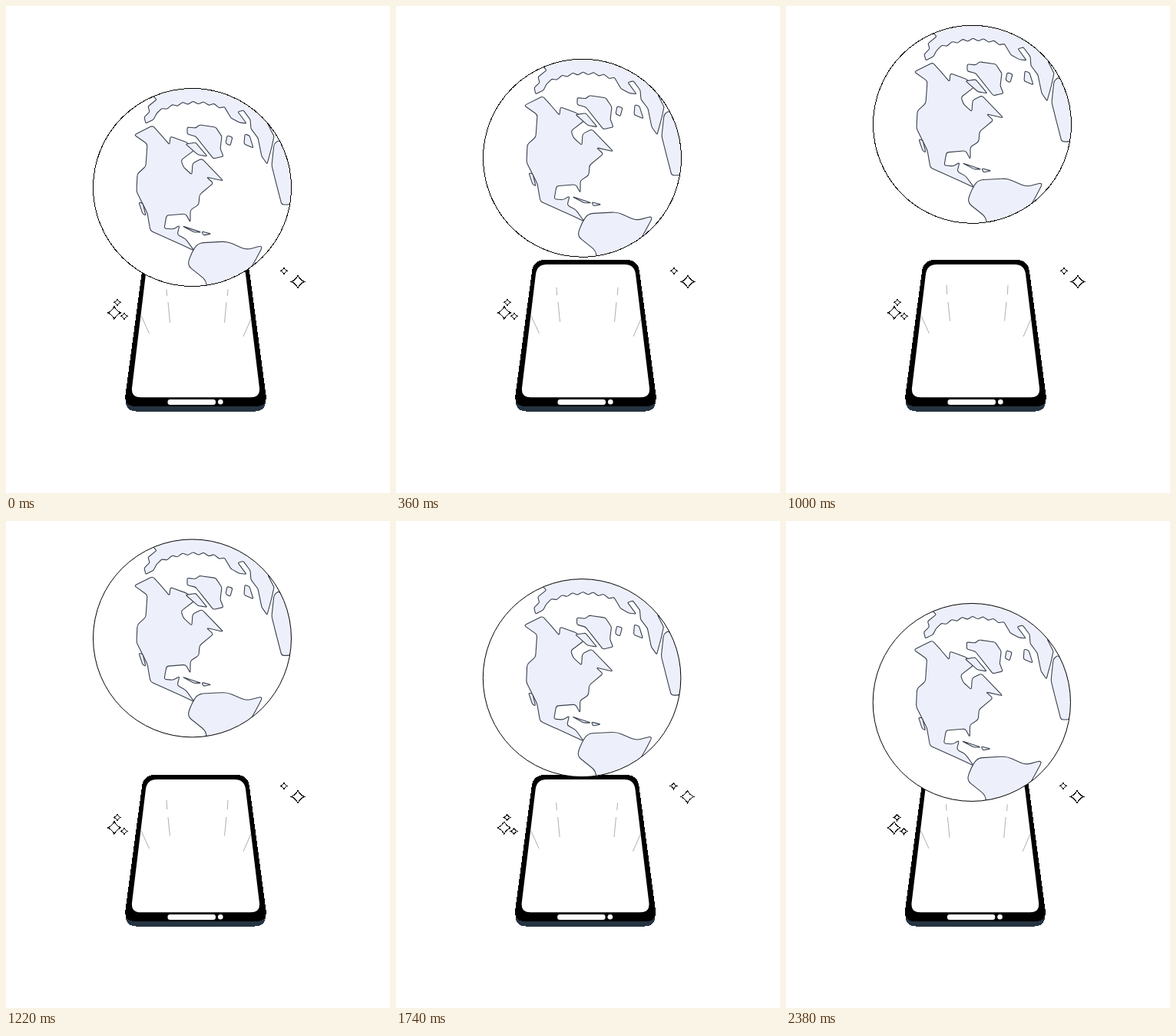
Write an HTML page that moves like this. It is 500x635 px and loops after 2.4 s.

```html
<!DOCTYPE html>
<html lang="en">
<head>
<meta charset="utf-8">
<title>Globe over phone</title>
<style>
html, body { margin: 0; width: 100%; height: 100%; overflow: hidden; background: #fff; }
svg { display: block; width: 500px; height: 635px; }
.land { fill: #edf0fa; stroke: #39414d; stroke-width: 1.1; stroke-linejoin: round; }
.crisp { shape-rendering: crispEdges; }
.ray { stroke: #8d8d8d; stroke-width: .7; fill: none; }
.star { fill: #fff; stroke: #000; stroke-width: 1.1; }
</style>
</head>
<body>
<svg viewBox="0 0 500 635" xmlns="http://www.w3.org/2000/svg">
  <defs><clipPath id="disc"><circle cx="242.5" cy="236.5" r="129"/></clipPath></defs>
  <g id="scene">
    <g id="phone"></g>
    <path class="ray" id="rays"/>
    <g id="stars"></g>
    <g id="globe">
      <circle cx="242.5" cy="236.5" r="129" fill="#fff"/>
      <g id="lands" clip-path="url(#disc)"></g>
      <circle class="crisp" cx="242.5" cy="236.5" r="129" fill="none" stroke="#000"/>
    </g>
  </g>
</svg>
<script>
const LOOP = 2400, HALF = LOOP / 2, LIFT = 86;
const $ = id => document.getElementById(id);

function add(parent, attrs, tag = "path") {
  const el = document.createElementNS("http://www.w3.org/2000/svg", tag);
  for (const k in attrs) el.setAttribute(k, attrs[k]);
  $(parent).append(el);
}

// Closed polygon whose corners are rounded by up to r
function rounded(r, pts) {
  const toward = (a, b) => {
    const len = Math.hypot(b[0] - a[0], b[1] - a[1]);
    const k = Math.min(.5, r / len);
    return [a[0] + (b[0] - a[0]) * k, a[1] + (b[1] - a[1]) * k];
  };
  const n = pts.length;
  return pts.map((p, i) => {
    const a = toward(p, pts[(i + n - 1) % n]), b = toward(p, pts[(i + 1) % n]);
    return `${i ? "L" : "M"}${a}Q${p} ${b}`;
  }).join("") + "Z";
}

// Phone: symmetric trapezoids about the middle line
const MID = 247;
function slab(top, bottom, halfTop, halfBottom, r, fill, cls = "") {
  const pts = [[MID - halfTop, top], [MID + halfTop, top], [MID + halfBottom, bottom], [MID - halfBottom, bottom]];
  add("phone", { class: cls, fill, d: rounded(r, pts) });
}
slab(338, 528.6, 67, 93, 17, "#263442", "crisp");
slab(331, 522, 68, 93.5, 15, "#000", "crisp");
slab(337, 510.3, 63.5, 84.5, 13, "#fff");
add("phone", { x: 210.5, y: 513, width: 62.5, height: 7, rx: 3.2, fill: "#fff" }, "rect");
add("phone", { cx: 279.3, cy: 516.2, r: 3.3, fill: "#fff" }, "circle");

// Land masses
const land = (r, ...pts) => add("lands", { class: "land", d: rounded(r, pts) });

const arctic = Array.from({ length: 14 }, (_, i) => {
  const x = 196 + 6.8 * i;
  return [x, 126 + (x - 246) ** 2 / 200 + (i % 2 ? -1.8 : 1.8)];
});
// Eurasia
land(1.5, [185, 110], [196, 122], [185, 131], [187, 138], [180, 145], [182, 153], [192, 148], ...arctic,
  [293, 146], [304, 152], [313, 153], [302, 138], [309, 136], [318, 148], [319, 160], [328, 172], [333, 196],
  [340, 206], [346, 184], [349, 170], [341, 154], [352, 164], [400, 180], [300, 60]);
// North America
land(3, [167, 168], [191, 156], [201, 167], [213, 181], [214, 170], [236, 178], [245, 188], [228, 201], [231, 210],
  [242, 220], [243, 205], [255, 199], [283, 228], [261, 223], [270, 231], [252, 246], [251, 259], [240, 266],
  [240, 282], [234, 271], [209, 273], [206, 290], [218, 291], [226, 286], [223, 298], [234, 304], [245, 319],
  [228, 311], [208, 302], [188, 293], [184, 270], [170, 242], [171, 219], [182, 209], [184, 180]);
// South America
land(7, [242, 321], [250, 309], [288, 307], [313, 318], [335, 312], [325, 331], [300, 375], [261, 372], [261, 358], [236, 338]);
// Africa
land(3, [349, 180], [355, 175], [362, 183], [390, 200], [370, 259], [359, 259], [352, 232], [346, 208]);
// Greenland and smaller islands
land(2, [236, 158], [247, 159], [252, 155], [273, 158], [281, 170], [279, 186], [283, 196], [270, 199], [247, 170], [236, 167]);
land(2, [234, 180], [247, 178], [262, 196], [250, 194]);
land(2, [288, 169], [295, 171], [292, 182], [286, 179]);
land(2, [311, 167], [317, 169], [322, 185], [310, 180]);
land(2, [230, 287], [254, 295], [245, 295]);
land(2, [255, 294], [267, 297], [257, 299]);
land(2, [173, 256], [178, 257], [182, 273], [178, 271]);

function star(x, y, r) {
  const k = r * .32;
  const tip = (dx, dy, cx, cy) => `Q${x + cx} ${y + cy} ${x + dx} ${y + dy}`;
  const d = `M${x} ${y - r}` + tip(r, 0, k, -k) + tip(0, r, k, k) + tip(-r, 0, -k, k) + tip(0, -r, -k, -k);
  add("stars", { class: "star crisp", d });
}
star(141, 400, 8.3);
star(145, 386.5, 4);
star(154, 404.5, 4);
star(380, 359.5, 8.3);
star(362, 345.5, 4);

// cubic-bezier(0, 0, .58, 1), solved by bisection
function easeOut(x) {
  let lo = 0, hi = 1;
  for (let i = 0; i < 24; i++) {
    const s = (lo + hi) / 2;
    if (1.74 * s * s - .74 * s * s * s < x) lo = s; else hi = s;
  }
  return lo * lo * (3 - 2 * lo);
}

function rays(up) {
  const side = s => {
    const x = d => 249 + s * d;
    return `M${x(40)} ${369.5 - 6 * up}L${x(39.3)} ${378 - 2 * up}` +
      `M${x(38)} 386L${x(35.5)} ${413 - 2.5 * up}`;
  };
  return side(-1) + side(1) + "M176 404L186.5 427M319 408L309 431";
}

function draw(ms) {
  const t = Math.floor(ms % LOOP / 20) * 20;
  const rising = t < HALF;
  const e = easeOut(t % HALF / HALF);
  const up = rising ? e : 1 - e;
  $("globe").setAttribute("transform", `translate(0 ${-LIFT * up})`);
  $("rays").setAttribute("d", rays(up));
  // slight narrowing while the globe sinks
  $("scene").setAttribute("transform", `scale(${rising ? 1 : 1 - .0027 * e} 1)`);
}

const start = performance.now();
function tick() {
  draw(performance.now() - start);
  requestAnimationFrame(tick);
}
draw(0);
requestAnimationFrame(tick);
</script>
</body>
</html>
```
